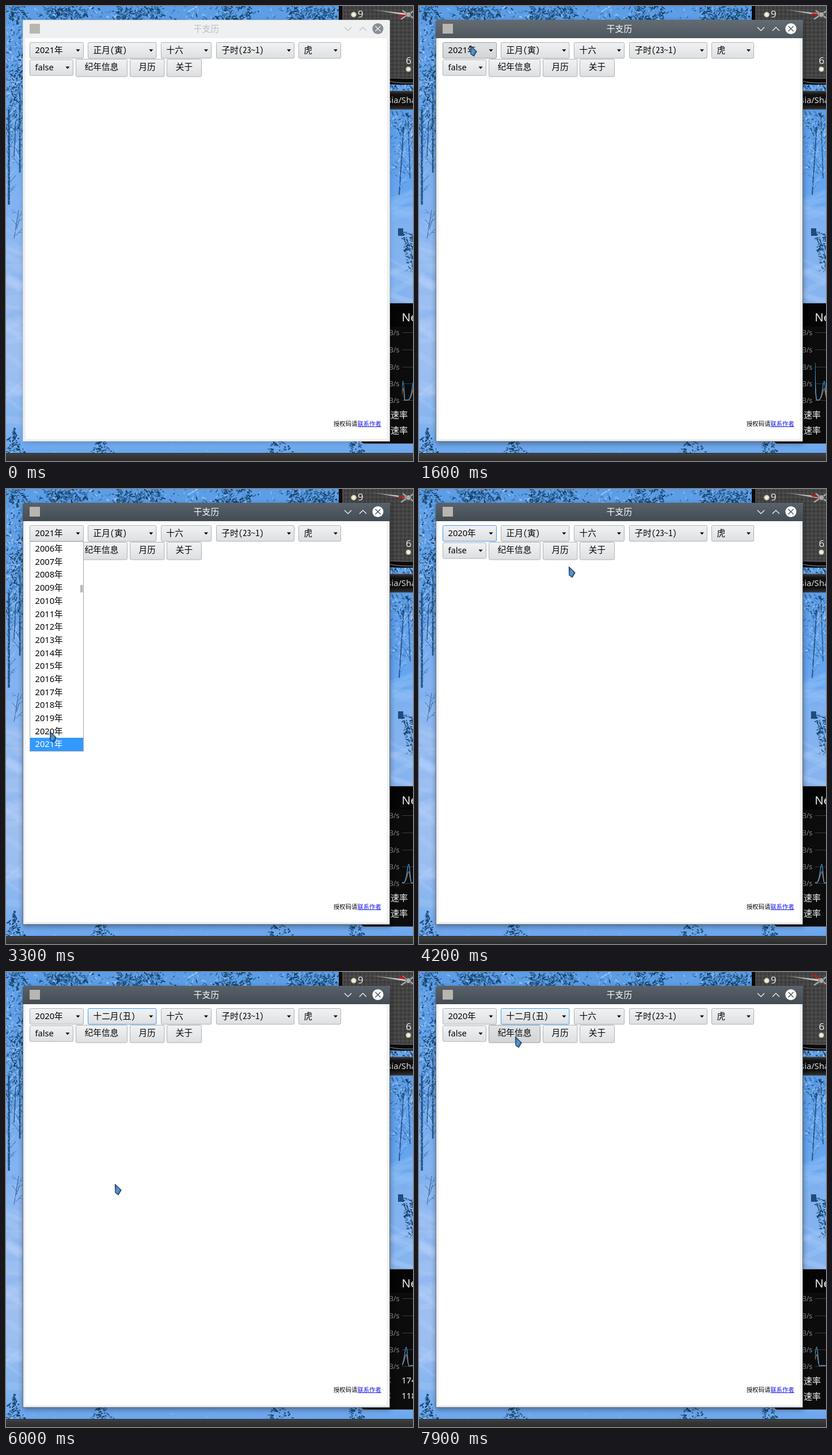
An HTML page with a canvas for the animation above (8 s loop, 707 by 792 pixels).

```html
<!DOCTYPE html>
<html lang="zh-CN">
<head>
<meta charset="utf-8">
<title>干支历</title>
<style>
html, body { margin: 0; width: 100%; height: 100%; overflow: hidden; background: #7badec; }
canvas, svg { position: absolute; left: 0; top: 0; width: 707px; height: 792px; }
text { font: 14.67px "Noto Sans", "Noto Sans CJK SC", sans-serif; white-space: pre; }
.kai { font-family: "Noto Sans Mono CJK SC", "Noto Sans CJK SC", "Noto Sans CJK", monospace; }
.kai:not(.small) { font-family: "Noto Sans CJK SC", "Noto Sans Mono CJK SC", sans-serif; font-weight: 300; font-feature-settings: "hwid"; }
.mid { text-anchor: middle; }
.end { text-anchor: end; }
.title { font-size: 14.8px; font-family: "Noto Sans CJK SC", "Noto Sans CJK", sans-serif; }
.small { font-size: 10.35px; font-weight: 300; }
.numeral { font: 300 17px "Noto Sans", sans-serif; fill: #e8e8e8; }
.unit { font-size: 12.3px; fill: #8b8b8b; }
.rate { fill: #f2f2f2; font-size: 15px; }
.box { fill: url(#face); stroke: #aeb1b4; }
.hover .box { fill: url(#dark); stroke: #9a9da0; }
.focus .box { stroke: #3d9bf0; }
.line { fill: none; stroke-width: 1.3; }
</style>
</head>
<body>
<canvas id="wall" width="707" height="792"></canvas>
<svg id="stage" viewBox="0 0 707 792">
  <defs>
    <linearGradient id="face" x2="0" y2="1"><stop stop-color="#f1f2f3"/><stop offset="1" stop-color="#dddfe1"/></linearGradient>
    <linearGradient id="dark" x2="0" y2="1"><stop stop-color="#e0e2e3"/><stop offset="1" stop-color="#d2d4d6"/></linearGradient>
    <linearGradient id="bar" x2="0" y2="1"><stop stop-color="#59626a"/><stop offset="1" stop-color="#434c53"/></linearGradient>
    <linearGradient id="dock" x2="0" y2="1"><stop stop-color="#4b4b4b"/><stop offset=".25" stop-color="#3a3a3a"/><stop offset="1" stop-color="#2b2b2b"/></linearGradient>
    <linearGradient id="nib" x2="1" y2="1"><stop stop-color="#2d6ba8"/><stop offset=".5" stop-color="#5b99d0"/><stop offset="1" stop-color="#1e4f82"/></linearGradient>
    <linearGradient id="label" x2="0" y2="1"><stop stop-color="#3a3a3a"/><stop offset=".2" stop-color="#121212"/><stop offset=".7" stop-color="#0c0c0c"/><stop offset="1" stop-color="#333"/></linearGradient>
    <radialGradient id="bead"><stop stop-color="#fffdf0"/><stop offset=".7" stop-color="#e3dcc6"/><stop offset="1" stop-color="#8d8674"/></radialGradient>
    <pattern id="check" width="10" height="10" patternUnits="userSpaceOnUse" patternTransform="rotate(45)">
      <rect width="10" height="10" fill="#4b4b4b"/><path d="M0 0h5v5h-5zM5 5h5v5h-5z" fill="#3c3c3c"/>
    </pattern>
    <filter id="blur" x="-10%" y="-10%" width="120%" height="120%"><feGaussianBlur stdDeviation="5"/></filter>
    <clipPath id="plot"><rect x="688" y="560" width="19" height="127"/></clipPath>
  </defs>

  <g id="clock">
    <path d="M578-5V80Q582 137 690 137H720V-5z" fill="#0a0a0a"/>
    <path d="M585-5V75Q590 126 690 126H720V-5z" fill="url(#check)" stroke="#777"/>
    <path d="M645 124Q665 133 690 134H710" fill="none" stroke="#9a9a9a"/>
    <circle cx="604" cy="15" r="5" fill="url(#bead)"/>
    <circle cx="699" cy="110" r="4.8" fill="url(#bead)"/>
    <text class="numeral" x="611" y="20">9</text>
    <text class="numeral" x="694.5" y="100.5">6</text>
    <path d="M640 7L699 13V17z" fill="#d5d5d5" stroke="#666" stroke-width=".6"/>
    <path d="M686 23L712 6M689 8L712 24" stroke="#a8a8a8" stroke-width="2.5"/>
    <g id="second"><path d="M-17-2.2L-6-1.2V1.2L-17 2.2z" fill="#c01a15"/></g>
    <circle cx="699" cy="15" r="4.5" fill="#aaa" stroke="#555"/>
  </g>
  <g>
    <rect x="600" y="148" width="120" height="32" fill="url(#label)" stroke="#555" stroke-width=".8"/>
    <text x="653" y="168.5" fill="#dcdcdc">Asia/Sha</text>
  </g>
  <g>
    <rect x="616" y="517.5" width="110" height="244" rx="7" fill="#0c0c0c" stroke="#4c4c4c"/>
    <rect x="660" y="518" width="47" height="40" fill="#050505"/>
    <text x="687.5" y="549" fill="#f0f0f0" style="font-size:20px">Network</text>
    <g id="grid"></g>
    <g clip-path="url(#plot)">
      <path id="up" class="line" stroke="#c9713d"/>
      <path id="down" class="line" stroke="#3c9be0"/>
    </g>
    <g id="rates"></g>
  </g>

  <rect x="0" y="778" width="707" height="14" fill="url(#dock)"/>
  <path d="M0 778.5H707" stroke="#252525"/>
  <path id="glint" d="M421 792V790H425" fill="none" stroke="#3a63e8" stroke-width="1.6"/>

  <rect x="30" y="27" width="637" height="733" filter="url(#blur)" opacity=".18"/>
  <rect id="shade" x="29" y="28" width="639" height="735" filter="url(#blur)" opacity="0"/>
  <path d="M29 758V27Q29 24 32 24H664Q667 24 667 27V758z" fill="#eff0f1"/>
  <path d="M29.5 758V27Q29.5 24.5 32 24.5H664Q666.5 24.5 666.5 27V757.5H29.5" fill="none" stroke="#d3d6d8"/>
  <rect x="34" y="56" width="627.5" height="697.5" fill="#fff"/>
  <g id="idle"></g>
  <g id="active" opacity="0">
    <path d="M29 56V27Q29 24 32 24H664Q667 24 667 27V56z" fill="url(#bar)"/>
    <path d="M29.5 56V758H666.5V56" fill="none" stroke="#59636b" stroke-width=".9"/>
  </g>
  <rect x="41" y="31" width="18" height="17" fill="#b9b6b0"/>
  <g id="form"></g>
  <text class="kai small" x="569" y="730.7">授权码请<tspan fill="#1414ee" text-decoration="underline">联系作者</tspan></text>
  <g id="years"></g>
  <g id="months"></g>
  <path id="cursor" d="M.6.6L11 10.6 6.2 18.8 1 15z" fill="url(#nib)" stroke="#12365c" stroke-width="1.2" stroke-linejoin="round"/>
</svg>
<script>
const $ = id => document.getElementById(id);
const put = (id, html) => $(id).insertAdjacentHTML('beforeend', html);

/* ---------- wallpaper ---------- */
let seed = 11;
const rnd = () => (seed = seed * 16807 % 2147483647) / 2147483647;
const span = (a, b) => a + rnd() * (b - a);
const pick = list => list[Math.floor(rnd() * list.length)];
const ctx = $('wall').getContext('2d');
const DARK = ['#184468', '#245888', '#163a5c', '#2f6ca4'];
const MIXED = [...DARK, '#3f82c4', '#5e9ee0', '#86b9f0', '#a4caf6'];
const TWIGS = ['#2f689f', '#3f7ebd', '#4f8fd2', '#8bbaf2', '#a6caf6'];

function stroke(x1, y1, x2, y2, color, width) {
  ctx.strokeStyle = color;
  ctx.lineWidth = width;
  ctx.beginPath();
  ctx.moveTo(x1, y1);
  ctx.lineTo(x2, y2);
  ctx.stroke();
}

// Needles and twigs scattered over a box
function thicket(x, y, w, h, count, colors = MIXED) {
  for (let i = 0; i < count; i++) {
    const px = x + rnd() * w, py = y + rnd() * h;
    stroke(px, py, px + span(-6, 6), py + span(-4, 7), pick(colors), span(.7, 2.4));
  }
}

// A fir whose branches widen downwards
function fir(x, top, h, w) {
  for (let i = 0; i < h * 2.2; i++) {
    const k = rnd(), px = x + span(-1, 1) * w * k / 2, py = top + k * h;
    stroke(px, py, px + span(-5, 5), py + span(0, 4), pick(rnd() < .8 ? DARK : MIXED), span(1, 2.4));
  }
}

// A bare tree: leaning trunk with forked, rising twigs
function bare(x, top, bottom, width = 2, lean = 0) {
  stroke(x + lean, top, x, bottom, '#235383', width);
  for (let y = top; y < bottom - 12; y += 6) {
    const bx = x + lean * (bottom - y) / (bottom - top);
    const tx = bx + (rnd() < .5 ? -1 : 1) * span(4, 14), ty = y - span(0, 9);
    stroke(bx, y + 9, tx, ty, pick(TWIGS), 1);
    stroke((bx + tx) / 2, (y + 9 + ty) / 2, tx + span(-3, 3), ty + 6, pick(TWIGS), .7);
  }
}

// Soft rolling snow
function drifts(x, y1, y2, w, count, color) {
  for (let i = 0; i < count; i++) {
    const y = span(y1, y2);
    stroke(x, y, x + w, y + span(-25, 25), color, span(5, 16));
  }
}

function paintWall() {
  const sky = ctx.createLinearGradient(0, 0, 0, 792);
  [[0, '#5b9de6'], [.25, '#6ba6ec'], [.42, '#82b3f0'], [.55, '#9abff1'], [.8, '#9dbff0'], [.92, '#84b4f0'], [1, '#62a2ee']]
    .forEach(([k, c]) => sky.addColorStop(k, c));
  ctx.fillStyle = sky;
  ctx.fillRect(0, 0, 707, 792);
  const side = ctx.createLinearGradient(0, 180, 0, 517);
  [[0, '#5d9ee9'], [.45, '#66a5ef'], [.6, '#80b1f0'], [1, '#86b4ef']].forEach(([k, c]) => side.addColorStop(k, c));
  ctx.fillStyle = side;
  ctx.fillRect(660, 180, 47, 337);

  thicket(0, 0, 578, 25, 260);
  [[12, 40], [105, 70], [232, 80], [395, 55], [535, 80]].forEach(([x, w]) => thicket(x - w / 2, 0, w, 24, w * 1.8, DARK));
  thicket(0, 20, 30, 120, 170);
  thicket(0, 110, 30, 110, 130, DARK);
  thicket(0, 130, 30, 130, 120, TWIGS);
  bare(5, 180, 346, 3.5);
  bare(24, 150, 290, 2.5);
  bare(14, 200, 262, 1.5, 3);
  bare(14, 355, 405, 1, 8);
  drifts(0, 345, 560, 29, 14, 'rgba(120,170,238,.16)');
  drifts(0, 420, 720, 29, 18, 'rgba(198,219,250,.16)');

  thicket(667, 135, 40, 14, 50);
  thicket(667, 180, 40, 40, 80);
  thicket(667, 205, 40, 85, 75, TWIGS);
  bare(683, 210, 329, 2, 8);
  bare(702, 185, 300, 1.5, -4);
  drifts(667, 320, 380, 40, 6, 'rgba(150,194,248,.25)');
  ctx.fillStyle = '#1f4c7c';
  ctx.fillRect(681, 387, 9, 13);
  thicket(690, 394, 17, 50, 60, DARK);
  thicket(698, 438, 9, 25, 16, DARK);
  drifts(667, 440, 515, 40, 7, 'rgba(180,208,248,.2)');

  fir(14, 733, 45, 38);
  thicket(0, 760, 707, 18, 45, ['#79b0f3', '#6ea9f1']);
  [[168, 46], [473, 58], [606, 36]].forEach(([x, w]) => fir(x, 745, 33, w));
}
paintWall();

/* ---------- window parts ---------- */
const controls = (ink, disc, cross) => `
  <text class="title mid" x="348" y="45.2" fill="${ink}">干支历</text>
  <path d="M588 37l6 6 6-6M614 43l6-6 6 6" fill="none" stroke="${ink}" stroke-width="1.2"/>
  <circle cx="646" cy="39.5" r="9.6" fill="${disc}"/>
  <path d="M641.5 35l9 9m0-9l-9 9" stroke="${cross}" stroke-width="1.2"/>`;
put('idle', controls('#b9bec2', '#888e93', '#eff0f1'));
put('active', controls('#fcfcfc', '#fcfcfc', '#434c53'));

// id, x, y, width, height, text, arrow x (none for plain buttons)
const fields = [
  ['year', 41, 63, 94, 28, '2021年', 125], ['month', 142, 63, 119.5, 28, '正月(寅)', 252],
  ['day', 269, 63, 88, 28, '十六', 347.5], ['hour', 365, 63, 136, 28, '子时(23~1)', 491.5],
  ['sign', 508, 63, 74, 28, '虎', 572.5], ['leap', 41, 93, 76, 28, 'false', 107],
  ['info', 121, 92, 90, 31, '纪年信息'], ['cal', 215, 92, 60.5, 31, '月历'], ['about', 279, 92, 61, 31, '关于']
];
fields.forEach(([id, x, y, w, h, label, arrow]) => {
  const latin = id === 'year' || id === 'leap';
  const tx = arrow ? x + 9.5 : x + w / 2;
  put('form', `<g id="${id}">
    <rect class="box" x="${x + .5}" y="${y + .5}" width="${w - 1}" height="${h - .5}" rx="2"/>
    <text class="${latin ? '' : 'kai'} ${arrow ? '' : 'mid'}" x="${tx}" y="${y + (latin ? 19 : 18.7)}">${label}</text>
    ${arrow ? `<path d="M${arrow - 3.5} ${y + 12.5}h7l-3.5 4z"/>` : ''}</g>`);
});

function list(id, x, w, bottom, first, rows, chosen, cls) {
  const step = 22.68;
  put(id, `<rect x="${x + .5}" y="91.5" width="${w - 1}" height="${bottom - 92}" fill="#fff" stroke="#a5a8ab"/>
    <rect x="${x + 1}" y="${Math.round(first + chosen * step - 10.6)}" width="${w - 2}" height="23" fill="#3399ff"/>` +
    rows.map((row, i) => `<text class="${cls}" x="${x + 9.5}" y="${first + i * step + 5.3}" fill="${i === chosen ? '#fff' : '#000'}">${row}</text>`).join(''));
}
list('years', 41, 94, 457, 103.8, Array.from({ length: 16 }, (_, i) => 2006 + i + '年'), 15, '');
put('years', '<rect x="129" y="167" width="4.5" height="13" fill="#b9b9b9"/>');
const branches = '寅卯辰巳午未申酉戌亥子丑';
const numbers = ['正', ...'二三四五六七八九十', '十一', '十二'];
list('months', 142, 119.5, 387, 101.5, ['农历月', ...numbers.map((n, i) => `${n}月(${branches[i]})`)], 1, 'kai');

[568, 598, 628, 657, 686].forEach(y =>
  put('grid', `<text class="unit end" x="683.5" y="${y + 4.8}">KiB/s</text><path d="M688 ${y + .5}H707" stroke="#3b3b3b"/>`));
[['下载', 174, 711], ['上传', 118, 738]].forEach(([name, n, y]) =>
  put('rates', `<text class="rate end" x="698" y="${y + 5.6}">${name}速率</text><text class="rate num" x="687" y="${y + 5.2}">${n}</text>`));

/* ---------- motion ---------- */
// time, x, y of the pointer
const path = [
  [100, 720, 340], [300, 600, 300], [600, 300, 170], [900, 92, 100], [1000, 92, 100], [1300, 89, 68.5],
  [2200, 89, 68.5], [2400, 112, 108], [2800, 112, 108], [3300, 76, 422], [3500, 76, 422],
  [3800, 185, 250], [4200, 260, 135], [4600, 226, 88], [4800, 213, 76], [5000, 213, 76],
  [5500, 189, 369], [6000, 189, 369], [6400, 240, 210], [6700, 300, 82], [7000, 288, 101],
  [7100, 288, 101], [7500, 200, 108], [7900, 167, 112.5]
];
const ticks = [800, 1600, 2900, 3800, 4700, 5700, 6600, 7600];
const shifts = [900, 2900, 4700, 6600];
const passed = (times, t) => times.filter(x => t >= x).length;

function pointer(t) {
  let i = path.findIndex(p => p[0] > t);
  if (i < 0) return path.at(-1).slice(1);
  if (i === 0) return path[0].slice(1);
  const [t0, x0, y0] = path[i - 1], [t1, x1, y1] = path[i], k = (t - t0) / (t1 - t0);
  return [x0 + (x1 - x0) * k, y0 + (y1 - y0) * k];
}

// Traffic peak sliding left, with an older spike leaving the plot
function traffic(n, height) {
  const x = 708.3 - 4.35 * n, y = 686 - height;
  const old = n === 0 ? `M687 686Q688.5 ${y} 689.5 ${y}Q691 ${y} 692.5 686`
    : n === 1 ? `M688 ${686 - height * 1.97}Q688.5 682 691 686` : `M687 ${686 - height * .05}`;
  return `${old}L${x - 9} 685.7C${x - 3} 683 ${x - 2.5} ${y} ${x} ${y}C${x + 2} ${y} ${x + 2.5} 686 ${x + 5} 686L${x + 8} 685L712 685.5`;
}

const show = (el, on) => el.style.display = on ? '' : 'none';
const within = (t, a, b) => t >= a && t < b;

function draw(now) {
  const t = Math.floor(now % 8000 / 100) * 100;
  const [x, y] = pointer(t);
  const open = within(t, 1900, 3500) ? 'year' : within(t, 5000, 5800) ? 'month' : '';
  const focus = within(t, 3500, 5000) ? 'year' : t >= 5800 ? 'month' : '';

  $('cursor').setAttribute('transform', `translate(${x} ${y})`);
  show($('cursor'), t >= 200);
  fields.forEach(([id, fx, fy, w, h]) => {
    const over = t >= 200 && x >= fx && x < fx + w && y >= fy && y < fy + h && (!open || open === id);
    $(id).setAttribute('class', (over ? 'hover ' : '') + (focus === id ? 'focus' : ''));
  });
  show($('years'), open === 'year');
  show($('months'), open === 'month');
  $('year').querySelector('text').textContent = t < 3500 ? '2021年' : '2020年';
  $('month').querySelector('text').textContent = t < 5800 ? '正月(寅)' : '十二月(丑)';

  const lit = t < 1500 ? 0 : t < 1600 ? .5 : t < 1700 ? .93 : 1;
  $('active').setAttribute('opacity', lit);
  $('idle').setAttribute('opacity', 1 - lit);
  $('shade').setAttribute('opacity', lit * .22);

  $('second').setAttribute('transform', `translate(699 15) rotate(${-10 + 6 * passed(ticks, t)})`);
  const n = passed(shifts, t);
  $('down').setAttribute('d', traffic(n, 33));
  $('up').setAttribute('d', traffic(n, 20));
  const wide = within(t, 4700, 6600);
  document.querySelectorAll('.rate.end').forEach(el => el.setAttribute('x', wide ? 669 : 698));
  document.querySelectorAll('.num').forEach(el => show(el, wide));
  show($('glint'), within(t, 4600, 5800));
}

const start = performance.now();
(function loop() {
  draw(performance.now() - start);
  requestAnimationFrame(loop);
})();
</script>
</body>
</html>
```
